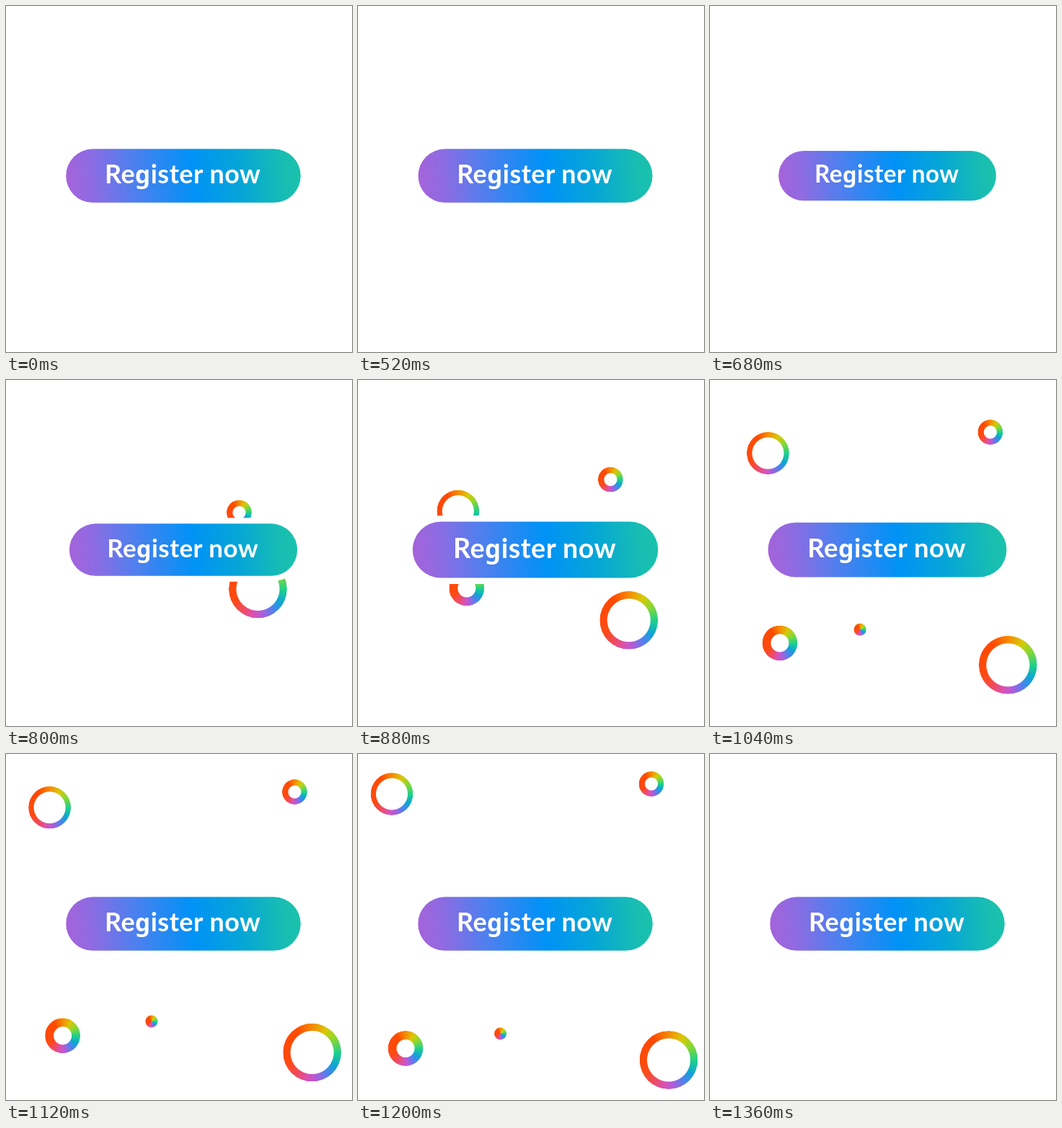
An HTML page that plays this animation: 480 by 480 pixels, repeating every 1880 ms.

```html
<!DOCTYPE html>
<html lang="en">
<head>
<meta charset="utf-8">
<title>Register now</title>
<style>
  html, body { margin: 0; width: 100%; height: 100%; overflow: hidden; background: #fff; }
  #stage { position: relative; width: 480px; height: 480px; overflow: hidden; }
  svg { position: absolute; left: 0; top: 0; }
  .ring {
    position: absolute; left: 0; top: 0; border-radius: 50%; visibility: hidden;
    background: conic-gradient(#f68a00, #d8c808 32deg, #8cd832 58deg, #1cd08c 92deg,
      #10a4d4 120deg, #4a84ee 142deg, #b45ad8 172deg, #d852b4 190deg, #f04a60 215deg,
      #ff4a12 245deg, #ff4a00 325deg, #f68a00);
  }
  text { font: 700 36px Lato, "Open Sans", sans-serif; letter-spacing: .46px; fill: #fff; }
  .plain { font: 600 33.5px "Noto Sans", sans-serif; }
</style>
</head>
<body>
<div id="stage">
  <svg id="top" width="480" height="480" viewBox="0 0 480 480">
    <defs>
      <linearGradient id="fill" gradientUnits="userSpaceOnUse" x1="86" y1="251" x2="406" y2="220">
        <stop offset="0" stop-color="#a463da"/>
        <stop offset=".1" stop-color="#8f6be2"/>
        <stop offset=".28" stop-color="#507fee"/>
        <stop offset=".54" stop-color="#0092f6"/>
        <stop offset=".75" stop-color="#06a6d6"/>
        <stop offset=".93" stop-color="#17bdb2"/>
        <stop offset="1" stop-color="#1ac2ac"/>
      </linearGradient>
    </defs>
    <g id="button">
      <rect x="75" y="190" width="342" height="91" rx="45.5" fill="#fff"/>
      <rect x="83.2" y="198.3" width="325.6" height="74.5" rx="37.25" fill="url(#fill)"/>
      <text x="137" y="246.2">Re<tspan class="plain">g</tspan>ister now</text>
    </g>
  </svg>
</div>
<script>
  const LOOP = 1880, STEP = 40, FLIGHT = 547;
  const stage = document.getElementById('stage');
  const svg = document.getElementById('top');
  const button = document.getElementById('button');

  // r: outer radius, hole: inner radius, land: end of flight, hide: time it disappears
  const rings = [
    { r: 29.5, hole: 22, from: [183.6, 243.7], to: [38.1, 43.3], land: 1335, hide: 1360 },
    { r: 24.5, hole: 12.5, from: [192.2, 230.6], to: [57.8, 420], land: 1335, hide: 1360 },
    { r: 8.5, hole: 0, from: [241.1, 217], to: [194.7, 399.1], land: 1335, hide: 1360 },
    { r: 17.5, hole: 9, from: [289.3, 242.3], to: [408.5, 38.9], land: 1262, hide: 1240 },
    { r: 40.5, hole: 30, from: [316.1, 234.9], to: [432.5, 427], land: 1262, hide: 1240 }
  ];

  for (const ring of rings) {
    const el = ring.el = document.createElement('div');
    el.className = 'ring';
    el.style.width = el.style.height = 2 * ring.r + 'px';
    if (ring.hole) {
      const mask = `radial-gradient(circle, transparent ${ring.hole - .5}px, #000 ${ring.hole + .5}px)`;
      el.style.webkitMaskImage = mask;
      el.style.maskImage = mask;
    }
    stage.insertBefore(el, svg);
  }

  // Button press: time and scale
  const keys = [[500, 1], [720, .92], [912, 1.056], [1112, 1]];
  const smooth = u => u * u * (3 - 2 * u);

  function scaleAt(t) {
    for (let i = 1; i < keys.length; i++) {
      const [t0, a] = keys[i - 1], [t1, b] = keys[i];
      if (t >= t0 && t < t1) return a + (b - a) * smooth((t - t0) / (t1 - t0));
    }
    return 1;
  }

  function draw(time) {
    const t = Math.floor(time % LOOP / STEP) * STEP;
    button.setAttribute('transform',
      `translate(246 235.5) scale(${scaleAt(t)}) translate(-246 -235.5)`);
    for (const { el, r, from, to, land, hide } of rings) {
      const shown = t >= land - FLIGHT && t < hide;
      el.style.visibility = shown ? 'visible' : 'hidden';
      if (!shown) continue;
      const left = Math.max(0, (land - t) / FLIGHT) ** 2;
      const [x, y] = to.map((end, i) => end + (from[i] - end) * left - r);
      el.style.transform = `translate(${x}px, ${y}px)`;
    }
  }

  const start = performance.now();
  function tick() {
    draw(performance.now() - start);
    requestAnimationFrame(tick);
  }
  tick();
</script>
</body>
</html>
```
